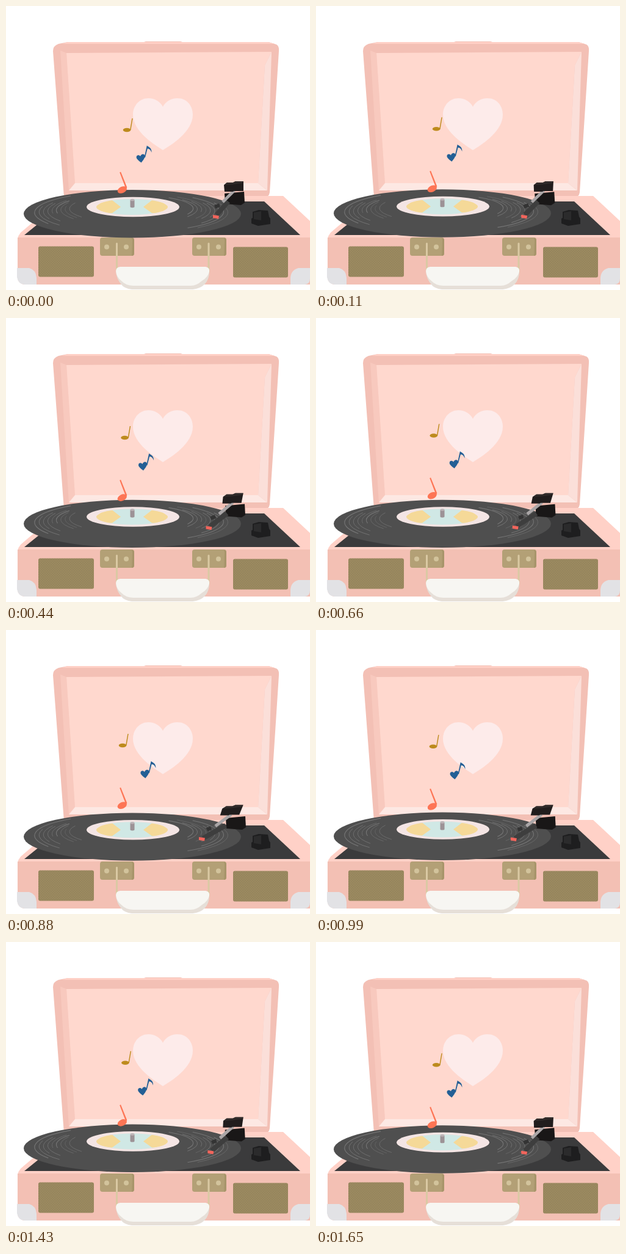
An HTML page for the animation above (1.76 s loop, 498 by 465 pixels).

```html
<!DOCTYPE html>
<html lang="en">
<head>
<meta charset="utf-8">
<title>Record player</title>
<style>
html, body { margin: 0; width: 100%; height: 100%; overflow: hidden; background: #fff; }
svg { display: block; width: 498px; height: 465px; }
</style>
</head>
<body>
<svg viewBox="0 0 498 465">
  <defs>
    <pattern id="mesh" width="4" height="4" patternUnits="userSpaceOnUse">
      <rect width="4" height="4" fill="#94845f"/>
      <path d="M0 0L4 4M4 0L0 4" stroke="#9f8d5e" stroke-width=".8"/>
    </pattern>
    <clipPath id="disc"><ellipse cx="206.500" cy="329" rx="58.500" ry="13"/></clipPath>
    <g id="latch">
      <rect y="379" width="56" height="30" rx="4" fill="#b3a076"/>
      <path d="M52 380Q56 380 56 384V405Q56 409 52 409L53 384Z" fill="#a8956b"/>
      <circle cx="11" cy="394.500" r="4" fill="#d2c39c"/>
      <circle cx="43" cy="394.500" r="4" fill="#d2c39c"/>
    </g>
    <path id="patch" d="M147 328L162 318L174 318L188 329L174 339L162 340L147 331Z" fill="#f5d998"/>
  </defs>

  <g id="lid">
    <path d="M77 74Q77 65 86 62L101 59H226L229 58H286L289 59H430L443 63Q448 66 447 74L432 305Q431 313 423 313H95Z" fill="#f3c0b5"/>
    <path d="M101 59H430L440 62H92Z" fill="#ffd0c6"/>
    <path d="M89 73L99 77L113 291L103 303Z" fill="#f8c9be"/>
    <path d="M99 77L435 75L424 97L413 291H113Z" fill="#ffd8ce"/>
    <path d="M435 75L424 97L413 290L428 302Z" fill="#fbdfd9"/>
    <path d="M113 290H413L428 302H103Z" fill="#fde8e3"/>
    <path d="M257 236C245 228 208 206 208 178C208 162 220 151 233 151C244 151 253 157 257 165C261 157 270 151 281 151C295 151 306 162 306 178C306 206 270 228 257 236Z" fill="#fdebea"/>
  </g>

  <g id="case">
    <path d="M20 377L24 371L95 311H454L498 352V379H20Z" fill="#ffd1c7"/>
    <path d="M30 375L98 320H423L482 375Z" fill="#3b3b3c"/>
    <path d="M19 379H498V456H30Q19 454 19 444Z" fill="#f3c0b4"/>
    <path d="M18 429H38Q49 432 50 445V456H30Q20 455 18 444Z" fill="#e2e2e5"/>
    <path d="M498 429H479Q467 432 466 445V456H490Q498 455 498 446Z" fill="#e2e2e5"/>
    <rect x="53" y="393.500" width="91" height="50" rx="3" fill="url(#mesh)"/>
    <rect x="372" y="394.500" width="90" height="50" rx="3" fill="url(#mesh)"/>
    <use href="#latch" x="154"/>
    <use href="#latch" x="305"/>
    <path d="M181.500 389V436M332 389V436" stroke="#dac9a3" stroke-width="3" stroke-linecap="round"/>
    <path d="M180 435Q181 446 188 455Q194 463 206 464H306Q318 463 326 455Q333 447 333 435Z" fill="#e6dfd8"/>
    <path d="M180 434Q180 428 187 427H327Q334 428 333 435Q331 444 321 450Q312 458 303 458H208Q195 457 189 450Q181 444 180 434Z" fill="#f7f6f2"/>
    <path d="M404 337L414 334L429 335L431 345L433 348V357L413 360L402 356V348L404 347Z" fill="#1e1e1f"/>
    <path d="M406 338L418 336V351L406 349Z" fill="#2b2b2c"/>
  </g>

  <g id="record">
    <ellipse cx="207" cy="340.300" rx="178" ry="39.200" fill="#4f4f4f"/>
    <g id="grooves" fill="none" stroke="#747474" stroke-linecap="round"></g>
    <ellipse cx="208" cy="329" rx="76" ry="16.300" fill="#f4e5e4"/>
    <g clip-path="url(#disc)">
      <rect x="167" y="315" width="80" height="28" fill="#d0e8e5"/>
      <use href="#patch"/>
      <use href="#patch" transform="translate(413) scale(-1 1)"/>
    </g>
    <path d="M203.500 318V328.500A3.500 1.700 0 0 0 210.500 328.500V318Z" fill="#9c9296"/>
    <ellipse cx="207" cy="317.500" rx="3.500" ry="1.800" fill="#bdb4b7"/>
  </g>

  <g id="arm">
    <path id="base" d="M358 307L390 304L391 322L385 326L359 324Z" fill="#191717"/>
    <line id="shell" stroke="#3e3e3e" stroke-width="8"/>
    <line id="clip" stroke="#343434" stroke-width="6"/>
    <line id="rod" stroke="#aaa6a7" stroke-width="5"/>
    <g id="weight">
      <path d="M0 -3L5 -7H15L19 -9H32V7H16L15 8H1Z" fill="#211d1d"/>
      <path d="M1 -3L5 -7H15L19 -9H32L30 -6L15 -4Z" fill="#302b2a"/>
    </g>
    <path id="tip" d="M-5 -3.500L5 -2L4 3L-5 1.500Z" fill="#f2655c"/>
  </g>

  <g id="gold" fill="#bd8b1d">
    <ellipse cx="198" cy="203" rx="6.300" ry="3.300"/>
    <path d="M203 203L206.300 184H207.700L204.500 203Z"/>
  </g>
  <g id="blue" fill="#235f95">
    <path d="M220.500 256.500C217 253 213 249 214 246C215 242.500 219 243 220.500 246C222.500 242 227 242 228 245.500C228.500 249 224 253.500 220.500 256.500Z" transform="rotate(-8 221 249)"/>
    <path d="M226.500 248L230.800 228.500C234 231 239 232 238.500 240C237 235.500 235 234 231.800 233.500L228 248Z"/>
  </g>
  <g id="coral" fill="#fd7555">
    <ellipse cx="190.300" cy="301" rx="8" ry="5.200" transform="rotate(-25 190.300 301)"/>
    <path d="M196.300 299L186.200 272.500L188 271.500L198.300 297Z"/>
  </g>
</svg>
<script>
const STEP = 110, STEPS = 16, HALF = STEPS / 2;
const GLINTS = 18;
const el = id => document.getElementById(id);
const place = (id, x, y, extra = "") =>
  el(id).setAttribute("transform", `translate(${x} ${y}) ${extra}`);

function seeded(seed) {
  return () => (seed = seed * 16807 % 2147483647) / 2147483647;
}

// Groove glints: arcs on the left and right of rings that narrow to the label
function glint(r, from, to, width) {
  const rx = 178 * r, ry = 39.2 * r, cy = 320.5 + 19.8 * r;
  const at = a => `${207 + rx * Math.cos(a)} ${cy + ry * Math.sin(a)}`;
  return `<path d="M${at(from)}A${rx} ${ry} 0 0 1 ${at(to)}" stroke-width="${width}"/>`;
}

function drawGrooves() {
  const rand = seeded(29);
  let arcs = "";
  for (let i = 0; i < GLINTS; i++) {
    const r = .56 + .36 * i / GLINTS;
    const mid = (i % 2 ? Math.PI : 0) + (rand() - .5) * .5;
    const half = .35 + .4 * rand();
    arcs += glint(r, mid - half, mid + half, .5 + .7 * rand());
  }
  el("grooves").innerHTML = arcs;
}

function line(id, x1, y1, x2, y2) {
  for (const [k, v] of Object.entries({ x1, y1, x2, y2 })) el(id).setAttribute(k, v);
}

// p runs from 0 (arm out, notes low) to 1 (arm in, notes high)
function drawArm(p) {
  place("base", 2 * p, p);
  place("weight", 357 - 4 * p, 296 - .5 * p, `skewX(${-22 * p})`);
  line("rod", 374 - 5 * p, 302, 355 - 12 * p, 321);
  line("shell", 364 - 4 * p, 320, 345 - 22 * p, 342 - p);
  line("clip", 350 - 14 * p, 326 - 2 * p, 342 - 13 * p, 329 - 2 * p);
  place("tip", 344 - 23 * p, 345.5 - 3 * p);
}

function draw(ms) {
  const n = Math.floor(ms / STEP) % STEPS;
  const side = HALF - Math.abs(n - HALF);
  const p = side / HALF;

  place("record", 0, -.86 * (5 - Math.abs(side - 5)));
  place("gold", -7 * p, -14 * p);
  place("blue", 6.8 * p, -13.7 * p);
  place("coral", 0, -13.7 * p);
  drawArm(p);
}

drawGrooves();
const start = performance.now();
function tick(now) {
  draw(Math.max(0, now - start));
  requestAnimationFrame(tick);
}
draw(0);
requestAnimationFrame(tick);
</script>
</body>
</html>
```
